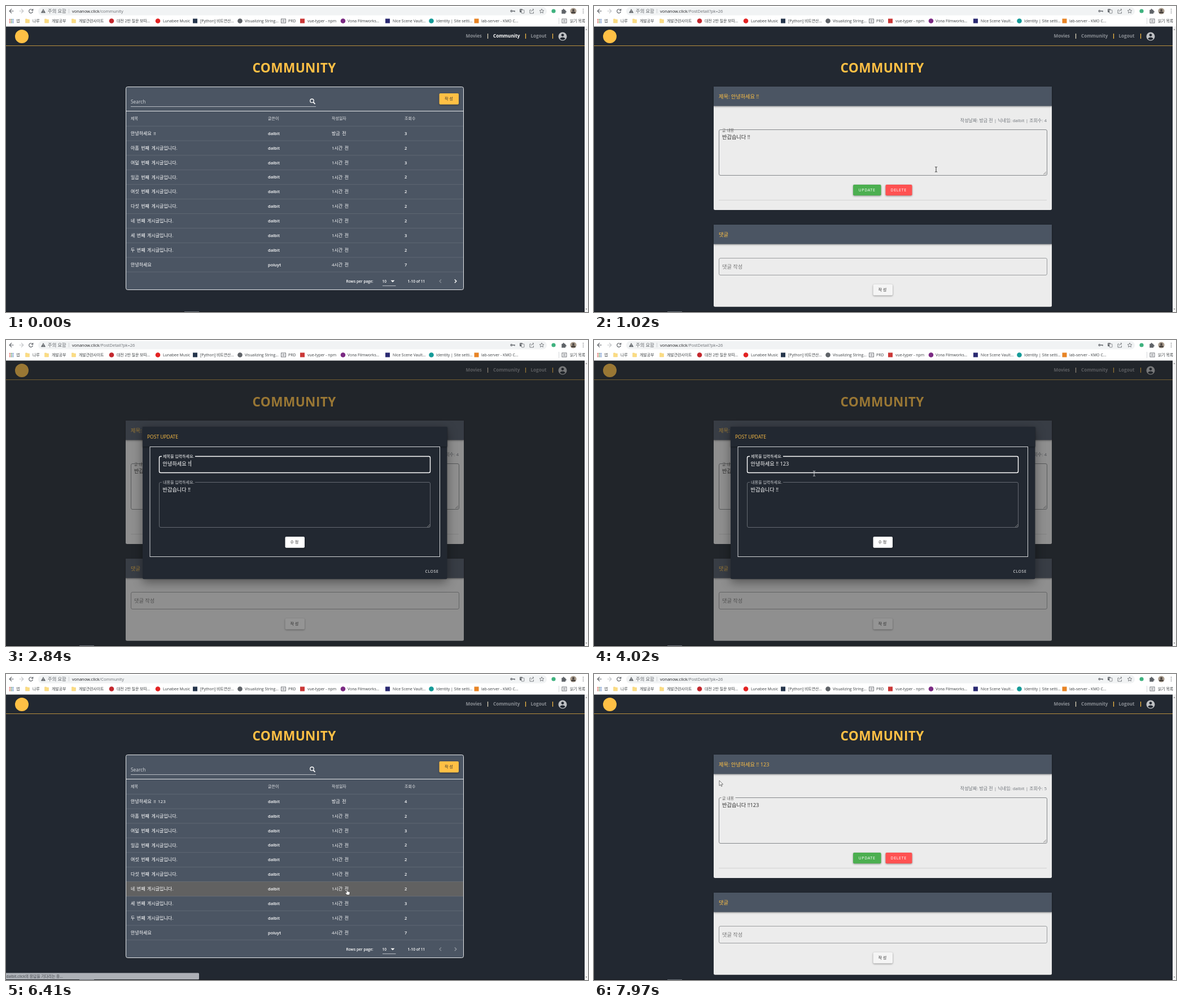
An HTML page that plays this animation: 1031 px wide and 543 px high, repeating every 8000 ms.

```html
<!DOCTYPE html>
<html lang="ko">
<head>
<meta charset="utf-8">
<title>Community board</title>
<style>
  html, body { margin: 0; width: 100%; height: 100%; overflow: hidden; background: #222831; }
  svg { display: block; width: 1031px; height: 543px; }
  text { font-family: "Open Sans", "Noto Sans CJK KR", "Noto Sans CJK", sans-serif; white-space: pre; }
  .raised { filter: drop-shadow(0 1px 1.5px rgba(0, 0, 0, .4)); }
  .dialog { filter: drop-shadow(0 6px 9px rgba(0, 0, 0, .4)); }
</style>
</head>
<body>
<svg id="stage" viewBox="0 0 1031 543"></svg>
<script>
const LOOP = 8000;
const BG = '#222831', SLATE = '#4b5563', GOLD = '#ffc045', PAPER = '#ececec';
const ROW_TOP = 213.2, ROW_H = 25.87;
const USER = 'dalbit', HOST = 'vonanow.click';

const rect = (x, y, w, h, fill, more = '') =>
  `<rect x="${x}" y="${y}" width="${w}" height="${h}" fill="${fill}" ${more}/>`;
const line = (x1, y1, x2, y2, color, width = 1) =>
  `<path d="M${x1} ${y1}L${x2} ${y2}" stroke="${color}" stroke-width="${width}"/>`;
const path = (d, color, width = 1.2, fill = 'none') =>
  `<path d="${d}" fill="${fill}" stroke="${color}" stroke-width="${width}"/>`;
const dot = (x, y, r, fill) => `<circle cx="${x}" cy="${y}" r="${r}" fill="${fill}"/>`;
// text placed by its visual middle
const text = (x, mid, str, size, fill, more = '') =>
  `<text x="${x}" y="${mid + size * .36}" font-size="${size}" fill="${fill}" ${more}>${str}</text>`;
const button = (x, y, w, h, fill, label, labelX, color, spacing = .6) =>
  rect(x, y, w, h, fill, 'rx="2" class="raised"') +
  text(labelX, y + h / 2, label, 7.1, color, `font-weight="500" letter-spacing="${spacing}"`);

function addressBar() {
  const icons = [
    path('M13.5 9H6.5M10 5.2L6.2 9L10 12.8', '#5f6368'),
    path('M23.5 9H30.5M27 5.2L30.8 9L27 12.8', '#c4c6c9'),
    path('M46.9 7.2A3.4 3.4 0 1 0 47.4 10M47.7 5v3h-3', '#5f6368'),
    path('M66 5.6L69.6 12H62.4Z', '#5f6368', .6, '#5f6368'),
    line(66, 7.6, 66, 9.8, '#fff', .8), dot(66, 11, .5, '#fff'),
    path('M897.5 9h3.5v1.6', '#5f6368', 1.4), dot(895.4, 9, 2, '#5f6368'), dot(895.4, 9, .7, '#fff'),
    rect(910, 5.2, 5, 6, '#5f6368', 'rx="1"'), rect(913, 7, 5, 6, '#f1f3f4', 'rx="1" stroke="#5f6368" stroke-width=".7"'),
    text(911, 8, 'G', 4, '#fff'),
    path('M930 7h-2v6h6.5v-3M930.5 10q.5-3.5 4.5-3.5M933 4.7l2 1.8l-2 1.8', '#5f6368', .8),
    path('M949 5.2l1.1 2.5l2.7.3l-2 1.8l.6 2.7l-2.4-1.4l-2.4 1.4l.6-2.7l-2-1.8l2.7-.3Z', '#5f6368', .8),
    dot(970, 9, 3.6, '#3fb27f'),
    path('M984.5 7h2v-.5a1.2 1.2 0 0 1 2.4 0v.5h2v2h.5a1.2 1.2 0 0 1 0 2.4h-.5v2h-6.4Z', '#5f6368', .4, '#5f6368'),
    dot(1005, 9, 5.6, '#a79a8b'), dot(1005, 7.5, 2, '#4b4540'),
    path('M1001 13q0-3.5 4-3.5t4 3.5Z', 'none', 0, '#4b4540'),
    [5.8, 9, 12.2].map(y => dot(1022.5, y, .8, '#5f6368')).join('')
  ];
  return rect(0, 0, 1031, 36.5, '#fff') + rect(57, 2, 901, 14.5, '#f1f3f4', 'rx="7.2"') + icons.join('') +
    text(74, 9, '주의 요함', 8.3, '#5f6368') + line(111.5, 5, 111.5, 13, '#c0c3c7', .7) +
    `<text x="117" y="11.7" font-size="7.5" fill="#202124">${HOST}<tspan id="route" fill="#6a6e73"></tspan></text>`;
}

function bookmarks() {
  const folder = x => path(`M${x - 3.5} 23h3l1 1h3v6h-7Z`, '#f0cf72', .5, '#fbdc83');
  const square = color => x => rect(x - 4, 22.5, 8, 8, color);
  const round = color => x => dot(x, 26.5, 4.3, color);
  const page = x => rect(x - 4, 23, 8, 7, 'none', 'stroke="#5f6368" stroke-width=".9"') +
    path(`M${x - 2} 25h4M${x - 2} 26.5h4M${x - 2} 28h4`, '#5f6368', .6);
  const items = [
    [38, folder, 47, '나루'], [72, folder, 81, '개발공부'], [120, folder, 129, '개발관련사이트'],
    [187, round('#c3272d'), 196, '대전 2반 질문 보따...'], [269, round('#e32323'), 278, 'Lunabee Music'],
    [335, square('#26364d'), 344, '[Python] 비트연산...'], [414.5, round('#5f6368'), 423, 'Visualizing String...'],
    [491.5, page, 500, 'PRD'], [525, square('#cb3837'), 534, 'vue-typer - npm'],
    [597, round('#7b2a83'), 605, 'Vona Filmworks...'], [676, square('#2b2a72'), 685, 'Nice Scene Vault...'],
    [753.5, round('#159b98'), 762, 'Identity | Site setti...'], [833.5, square('#e88425'), 842, 'lab-server - KMO C...'],
    [989, page, 999, '읽기 목록']
  ];
  let out = text(18, 26.5, '앱', 7, '#3c4043') + line(979.5, 21, 979.5, 32, '#d5d7da');
  for (let i = 0; i < 9; i++) out += rect(6 + i % 3 * 2.8, 23 + (i / 3 | 0) * 2.8, 1.7, 1.7, ['#d9493e', '#4c8a55', '#4a78c9'][i % 3]);
  return out + items.map(([x, icon, tx, label]) => icon(x) + text(tx, 26.5, label, 6.9, '#3c4043')).join('');
}

function siteHeader() {
  const nav = (x, label, id = '') => text(x, 53.3, label, 8.1, '#8a8e94', `font-weight="700" ${id}`);
  return rect(0, 36, 1025, 35, BG) + line(0, 70.5, 1025, 70.5, '#b98f3f') + dot(28, 54, 12, GOLD) +
    nav(814.5, 'Movies') + nav(863, 'Community', 'id="navBoard"') + nav(929.5, 'Logout') +
    line(853.5, 49, 853.5, 58, '#e8dcc0', 1.2) + line(920.5, 49, 920.5, 58, GOLD, 1.2) +
    line(968.5, 49, 968.5, 58, GOLD, 1.2) +
    dot(986, 54, 7.5, '#bfc1c4') + dot(986, 51.6, 2.4, BG) + path('M981.3 58.2q1-2.7 4.7-2.7t4.7 2.7q-4.7 4-9.4 0Z', 'none', 0, BG);
}

const heading = text(436.5, 109.5, 'COMMUNITY', 22.6, GOLD, 'font-weight="700" letter-spacing=".4"');

function listPage() {
  const medium = 'font-weight="500" word-spacing="1.4"', semibold = 'font-weight="600"';
  const cols = [221, 464, 577, 706];
  const ordinals = ['아홉', '여덟', '일곱', '여섯', '다섯', '네', '세', '두'];
  const views = [3, 2, 3, 2, 2, 2, 2, 3, 2, 7];
  const titles = ['', ...ordinals.map(n => n + ' 번째 게시글입니다.'), '안녕하세요'];
  let out = heading + rect(212.5, 143.5, 598, 360, SLATE, 'rx="3"') +
    rect(213, ROW_TOP, 597.5, ROW_H, '#616161', 'id="hover"') +
    text(221, 169.5, 'Search', 8.4, '#d5d8dc') + line(221, 178.5, 549, 178.5, '#b5bac1') +
    path('M544.5 170.8L547.5 173.8', '#fff', 1.7) + `<circle cx="542" cy="168.2" r="3.2" fill="none" stroke="#fff" stroke-width="1.3"/>` +
    button(767.5, 155, 34.5, 19.8, GOLD, '작성', 777, '#333', 1.8) + line(213, 186.5, 810.5, 186.5, '#e6e8ea');
  ['제목', '글쓴이', '작성일자', '조회수'].forEach((h, i) => out += text(cols[i], 199.6, h, 7, '#e4e6e9', medium));
  titles.forEach((title, i) => {
    const mid = ROW_TOP + (i + .5) * ROW_H;
    const cells = [
      [title, 8, medium + (i ? '' : ' id="rowTitle"')],
      [i < 9 ? USER : 'poiuyt', 7.5, semibold],
      [i === 0 ? '방금 전' : i < 9 ? '1시간 전' : '4시간 전', 8, medium],
      [views[i], 7.5, semibold + (i ? '' : ' id="rowViews"')]
    ];
    cells.forEach(([str, size, style], k) => out += text(cols[k], mid, str, size, '#fff', style));
  });
  for (let i = 0; i <= 10; i++) out += line(213, ROW_TOP + i * ROW_H, 810.5, ROW_TOP + i * ROW_H, 'rgba(255,255,255,.11)');
  const foot = (x, s) => text(x, 488.5, s, 6.6, '#fff', semibold);
  return out + foot(602.5, 'Rows per page:') + foot(666.5, '10') + foot(711.5, '1-10 of 11') +
    path('M681.5 486.8h7l-3.5 3.5Z', 'none', 0, '#fff') + line(667, 496.5, 690.5, 496.5, '#b5bac1') +
    path('M771 485.2l-3 3l3 3', '#858c96', 1.3) +
    `<path id="next" d="M794.8 485.2l3 3l-3 3" fill="none" stroke-width="1.4"/>` +
    rect(212.5, 143.5, 598, 360, 'none', 'rx="3" stroke="#e6e8ea"');
}

const card = (y, h, title) => rect(212, y, 599, h, PAPER, 'rx="2.5"') +
  rect(212, y, 599, 34.5, SLATE, 'class="raised"') + title;
const outline = (x, y, w, h, stroke, id = '') =>
  rect(x + .5, y + .5, w - 1, h - 1, 'none', `rx="2.5" stroke="${stroke}" ${id}`);
const grip = (x, y, color) => path(`M${x - 5} ${y}L${x} ${y - 5}M${x - 2.5} ${y}L${x} ${y - 2.5}`, color, .7);

function detailPage() {
  return heading +
    card(143, 219, text(221, 160.3, '', 9.2, GOLD, 'id="postTitle"')) +
    text(802, 203, '', 8, '#70757b', 'id="meta" text-anchor="end"') +
    outline(221, 219, 582, 82, '#85888b') + rect(225.5, 218, 25, 4, PAPER, 'id="notch"') +
    text(227, 220.5, '글 내용', 6.9, '#666') + text(227, 232.3, '', 9.2, '#2a2a2a', 'id="postBody"') +
    grip(801, 299, '#666') +
    button(459, 317, 49.5, 19.3, '#4caf50', 'UPDATE', 468.5, '#fff') +
    button(516.5, 317, 47, 19.3, '#ff5252', 'DELETE', 525.5, '#fff') +
    line(221, 344.5, 802, 344.5, '#d2d2d2') +
    card(388, 145.7, text(221, 405.5, '댓글', 9.2, GOLD)) +
    outline(221, 447, 582, 31, '#9b9d9f') + text(227, 462.8, '댓글 작성', 9.2, '#777') +
    button(494.5, 494, 34.5, 19.5, '#f5f5f5', '작성', 503.5, '#333', 1.8);
}

function dialog() {
  const field = (id, y, h, label) => outline(271, y, 481, h, '#656a72', `id="${id}Box"`) +
    rect(276, y - 2, 59, 4.5, BG) + text(278, y + .7, label, 7, '#c9ccd0', `id="${id}Label" font-weight="500"`) +
    text(277.5, y + 13.2, '', 9.2, '#fff', `id="${id}Text" font-weight="500"`);
  return `<g class="dialog">${rect(242, 154, 539.5, 270.3, BG, 'rx="2.5"')}</g>` +
    rect(242, 154, 539.5, 35, BG, 'class="raised"') + text(250, 172, 'POST UPDATE', 8.5, GOLD) +
    rect(255, 189.5, 513.5, 195, BG, 'stroke="#d4d6d9"') +
    field('title', 206, 30, '제목을 입력하세요.') + field('body', 252, 81, '내용을 입력하세요.') +
    grip(751, 332, '#999') + button(494.5, 349, 34.5, 19.8, '#fff', '수정', 503.5, '#333', 1.8) +
    text(742.5, 411, 'CLOSE', 6.9, '#fff', 'font-weight="500" letter-spacing=".65"') +
    rect(0, 0, .8, 11, '#fff', 'id="caret"');
}

const pointers = `<g id="pointer">
  <path id="arrow" d="M0 0V9.2L2.2 7.3L3.7 10.5L5 9.9L3.6 6.8H6.5Z" fill="#fff" stroke="#222" stroke-width=".6"/>
  <path id="hand" d="M-.8 0Q0-1 .8 0V3.5L4.6 4.7Q5.3 5 5.2 6L4.5 10H-.3L-3 6.4Q-3 5.2-1.8 5.7L-.8 6.5Z" fill="#fff" stroke="#222" stroke-width=".6"/>
  <path id="ibeam" d="M-2-4.5Q0-4.5 0-3.5Q0-4.5 2-4.5M0-3.5V3.5M-2 4.5Q0 4.5 0 3.5Q0 4.5 2 4.5" fill="none" stroke-width=".9"/></g>`;

const stage = document.getElementById('stage');
stage.innerHTML = rect(0, 0, 1031, 543, BG) +
  `<g id="list">${listPage()}</g><g id="detail">${detailPage()}</g>` + siteHeader() +
  rect(0, 36, 1025, 506, '#212121', 'id="shade"') + `<g id="dialog">${dialog()}</g>` +
  addressBar() + bookmarks() +
  rect(1025, 36, 6, 507, '#f5f5f5') + path('M1026.5 42.5h3l-1.5-2Z', 'none', 0, '#777') + path('M1026.5 537h3l-1.5 2Z', 'none', 0, '#777') +
  rect(0, 542, 1025, 1, '#15181c') + rect(0, 542, 26, 1, '#6a6f76', 'id="strip"') +
  `<g id="status">${rect(-1, 530.5, 343, 11.5, '#dee1e6', 'rx="1.5"')}${text(.5, 536.5, USER + '.click의 응답을 기다리는 중...', 6.8, '#50545a')}</g>` + pointers;

const el = {};
stage.querySelectorAll('[id]').forEach(node => el[node.id] = node);
const set = (id, attrs) => { for (const k in attrs) el[id].setAttribute(k, attrs[k]); };
const show = (id, on) => el[id].style.display = on ? '' : 'none';
const fade = (id, v) => { el[id].style.opacity = v; show(id, v > 0); };
const write = (id, s) => { if (el[id].textContent !== s) el[id].textContent = s; };
const ramp = (t, a, b) => Math.min(1, Math.max(0, (t - a) / (b - a)));
const within = (t, a, b) => t >= a && t < b;

// time, x, y of the pointer
const track = [
  [20, 968, 330], [330, 612, 232], [480, 606, 228], [900, 606, 232], [1020, 606, 290], [1450, 490, 330],
  [1700, 486, 328], [1800, 484, 325], [2020, 390, 303], [2350, 390, 219], [3850, 390, 219], [4020, 390, 237],
  [4200, 400, 275], [4500, 400, 275], [4840, 430, 290], [4890, 538, 354], [5080, 538, 354], [5350, 513, 358],
  [5910, 513, 358], [6000, 598, 377], [6140, 598, 377], [6400, 604, 382], [6550, 604, 382], [6850, 412, 226],
  [7490, 412, 226], [7950, 222, 189]
];
function pointerAt(t) {
  const i = track.findIndex(k => k[0] > t);
  if (i < 0) return track[track.length - 1].slice(1);
  if (i === 0) return track[0].slice(1);
  const [a, x0, y0] = track[i - 1], [b, x1, y1] = track[i];
  const p = (t - a) / (b - a), e = p * p * (3 - 2 * p);
  return [x0 + (x1 - x0) * e, y0 + (y1 - y0) * e];
}
const typed = (base, tail, times, t) => base + tail.slice(0, times.filter(at => t >= at).length);

function drawPointer(t, listOn, dialogOn, detailOn) {
  const [x, y] = pointerAt(t);
  const visible = t >= 20 && !within(t, 2550, 3850) && !within(t, 4500, 4840);
  const inside = (l, top, r, bottom) => x > l && x < r && y > top && y < bottom;
  const row = Math.floor((y - ROW_TOP) / ROW_H);
  const overRow = listOn && inside(212, ROW_TOP, 811, ROW_TOP + 10 * ROW_H);
  let kind = 'arrow';
  if (overRow) kind = 'hand';
  else if (dialogOn) kind = inside(494, 349, 529, 369) ? 'hand' : inside(271, 206, 752, 238) || inside(271, 252, 752, 334) ? 'ibeam' : 'arrow';
  else if (detailOn) kind = inside(459, 317, 508, 337) ? 'hand' : inside(221, 220, 802, 300) ? 'ibeam' : 'arrow';
  show('pointer', visible);
  ['arrow', 'hand', 'ibeam'].forEach(id => show(id, id === kind));
  set('pointer', { transform: `translate(${x} ${y})` });
  set('ibeam', { stroke: dialogOn ? '#d8dadd' : '#222' });
  show('hover', visible && overRow);
  set('hover', { y: ROW_TOP + row * ROW_H });
}

function drawDialog(t) {
  const on = within(t, 1880, 6380);
  show('dialog', on);
  fade('shade', .46 * (ramp(t, 1850, 2060) - ramp(t, 6150, 6350)));
  const slide = t < 5000 ? Math.pow(1 - ramp(t, 1880, 2180), 4) : ramp(t, 6150, 6380) ** 2;
  set('dialog', { transform: `translate(0 ${-270 * slide})` });
  write('titleText', typed('안녕하세요 !!', ' 123', [2850, 3270, 3480, 3640], t));
  write('bodyText', typed('반갑습니다 !!', '123', [4600, 4690, 4800], t));
  const focus = within(t, 2440, 4250) ? 'title' : within(t, 4250, 5620) ? 'body' : '';
  ['title', 'body'].forEach(id => {
    const active = id === focus;
    set(id + 'Box', { stroke: active ? '#fff' : '#656a72', 'stroke-width': active ? 1.4 : 1 });
    set(id + 'Label', { fill: active ? '#fff' : '#c9ccd0' });
  });
  const blinkOff = within(t, 3080, 3270) || within(t, 4020, 4250) || within(t, 5300, 5620);
  show('caret', focus && !blinkOff);
  if (focus && on) set('caret', {
    x: 277.5 + el[focus + 'Text'].getComputedTextLength(),
    y: focus === 'title' ? 213.5 : 260
  });
  return on;
}

function draw(t) {
  const edited = t > 6140;
  const list = t < 3000 ? 1 - ramp(t, 430, 620) : ramp(t, 6290, 6400) - ramp(t, 6960, 7200);
  const detail = t < 3000 ? ramp(t, 850, 1000) : t < 7000 ? 1 - ramp(t, 6170, 6280) : ramp(t, 7490, 7650);
  fade('list', list);
  fade('detail', detail);
  fade('status', t < 7500 ? ramp(t, 6300, 6450) : 0);
  write('route', t < 430 ? '/community' : within(t, 6280, 6960) ? '/Community' : '/PostDetail?pk=26');
  set('navBoard', { fill: t < 430 ? '#fff' : '#8a8e94' });
  set('strip', { x: t < 430 ? 316 : 130 });
  set('next', { stroke: edited ? '#8d949d' : '#fff' });
  write('rowTitle', edited ? '안녕하세요 !! 123' : '안녕하세요 !!');
  write('rowViews', edited ? '4' : '3');
  const reopened = t > 7200;
  write('postTitle', reopened ? '제목: 안녕하세요 !! 123' : '제목: 안녕하세요 !!');
  write('postBody', reopened ? '반갑습니다 !!123' : '반갑습니다 !!');
  write('meta', `작성날짜: 방금 전 | 닉네임: ${USER} | 조회수: ${reopened ? 5 : 4}`);
  show('notch', reopened);
  const dialogOn = drawDialog(t);
  drawPointer(t, list > .5, dialogOn, detail > .5);
}

const start = performance.now();
function tick() {
  draw((performance.now() - start) % LOOP);
  requestAnimationFrame(tick);
}
tick();
</script>
</body>
</html>
```
